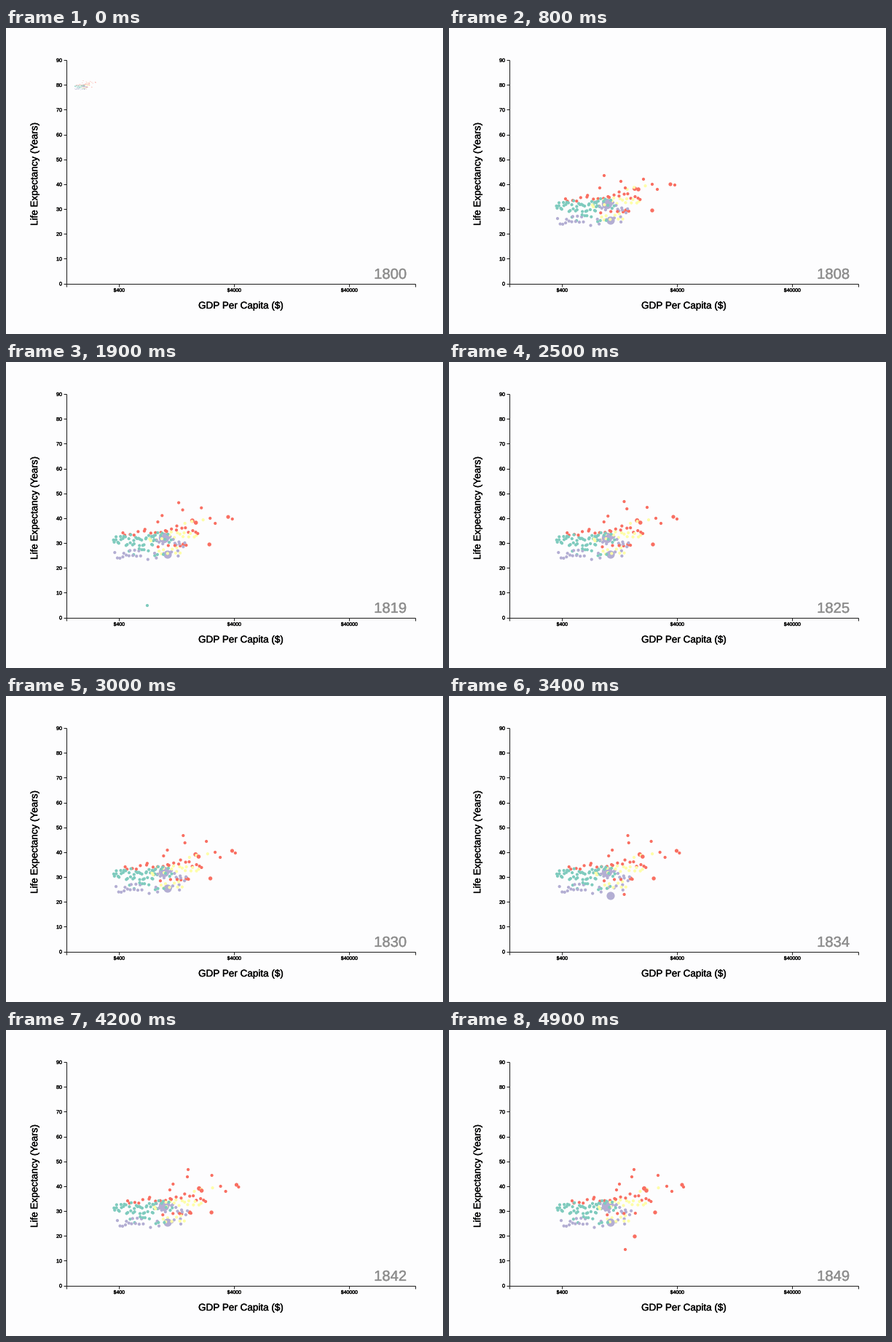
A matplotlib script that plays this animation: 600x421 px, repeating every 5000 ms.

```python
import matplotlib.pyplot as plt
import numpy as np
from matplotlib.animation import FuncAnimation
from matplotlib.patheffects import withStroke

W, H, DPI = 600, 421, 128
PX = 72 / DPI                       # points per pixel
LEFT, TOP, RIGHT, BOTTOM = 82.5, 44, 561.5, 351.5
DECADE = 158                        # width of one power of ten on the x axis
FRAMES, INTERVAL, FIRST_YEAR = 50, 100, 1800
ENTER = 0.18                        # progress of the dots when they first appear

TEAL, PURPLE, RED, YELLOW = "#7fcbbe", "#b3aed3", "#f96f62", "#fefea8"

# count, x range, y at both ends, y spread, drift to the right, colour
CLOUDS = [
    (36, 146, 205, 245, 245, 8, 1, TEAL),
    (12, 198, 228, 243, 245, 10, 2, TEAL),
    (10, 166, 223, 262, 260, 7, 2, TEAL),
    (13, 149, 186, 266, 262, 5, 5, PURPLE),
    (16, 202, 246, 242, 246, 9, 5, PURPLE),
    (8, 194, 242, 267, 264, 5, 5, PURPLE),
    (18, 194, 262, 241, 235, 6, 9, YELLOW),
    (8, 205, 242, 264, 257, 6, 8, YELLOW),
    (3, 240, 281, 222, 216, 1, 18, YELLOW),
    (14, 154, 238, 237, 228, 4, 9, RED),
    (7, 232, 266, 229, 233, 4, 15, RED),
    (4, 198, 250, 254, 251, 1, 9, RED),
]
# x, y, drift, change in height, radius of the dots outside the crowd
OUTLIERS = [
    (236, 211, 18, -19, 2.1), (267, 208, 20, -8, 2.1), (242, 220, 9, -18, 2.1),
    (213, 203, 21, 9, 2.1), (207, 220, 23, 0, 2.1), (304, 215, 16, -2, 2.6),
    (255, 221, 13, -3, 3.0), (260, 222, 11, -1, 2.8), (310, 216, 12, 0, 2.1),
    (279, 215, 20, 0, 2.1), (286, 222, 20, 0, 2.1), (279, 251, 4, 0, 2.7),
    (243, 251, 12, 0, 2.7), (239, 253, 3, 0, 2.1),
]
GIANTS = [(217, 242, 0, 0, 7.2), (222, 265, 0, 0, 5.6)]
# year, usual x and y of a dot, its height in that one year
DISASTERS = [(1819, 196, 251, 335), (1834, 222, 265, 275), (1834, 239, 253, 273),
             (1849, 239, 253, 302), (1849, 243, 251, 284)]

rng = np.random.default_rng(4)


def cloud(count, x0, x1, y0, y1, spread, drift, color):
    """Spread dots evenly but irregularly along a sloping band."""
    u = (np.arange(count) + rng.random(count)) / count
    x = x0 + u * (x1 - x0)
    y = y0 + u * (y1 - y0) + rng.uniform(-spread, spread, count)
    return [(a, b, drift, 0, 2.1, color) for a, b in zip(x, y)]


crowd = [dot for row in CLOUDS for dot in cloud(*row)]
crowd += [(*dot, RED) for dot in OUTLIERS]
crowd = [crowd[i] for i in rng.permutation(len(crowd))]
middle = len(crowd) * 3 // 4
dots = crowd[:middle] + [(*dot, PURPLE) for dot in GIANTS] + crowd[middle:]
x, y, drift, rise, radius = np.array([dot[:5] for dot in dots]).T
colors = [dot[5] for dot in dots]


def positions(frame):
    growth = np.clip((frame - 17) / 32, 0, 1)
    change = np.clip((frame - 8) / 12, 0, 1)
    xy = np.column_stack((x + drift * growth, y + rise * change))
    for when, usual_x, usual_y, low in DISASTERS:
        if when == FIRST_YEAR + frame:
            xy[np.hypot(x - usual_x, y - usual_y).argmin(), 1] = low
    return xy


plt.rcParams["font.family"] = "Liberation Sans"
plt.rcParams["text.hinting"] = "none"
fig = plt.figure(figsize=(W / DPI, H / DPI), dpi=DPI, facecolor="#fdfdfe")
ax = fig.add_axes([0, 0, 1, 1])
ax.set(xlim=(0, W), ylim=(H, 0))
ax.axis("off")


def line(xs, ys):
    ax.plot(xs, ys, color="#1c1c1c", lw=PX, solid_capstyle="butt")


def label(x, y, text, size, color="black", **style):
    options = dict(ha="center", va="baseline") | style
    bolder = withStroke(linewidth=0.3 * PX, foreground=color)
    return ax.text(x, y, text, fontsize=size * PX, color=color,
                   path_effects=[bolder], **options)


line((LEFT, LEFT), (TOP, BOTTOM))
line((LEFT, RIGHT), (BOTTOM, BOTTOM))
for value in range(0, 91, 10):
    tick = BOTTOM - value * (BOTTOM - TOP) / 90
    line((LEFT - 4, LEFT), (tick, tick))
    label(LEFT - 5.5, tick + 2.8, str(value), 7.1, ha="right")
for tick in (LEFT, RIGHT):
    line((tick, tick), (BOTTOM, BOTTOM + 4))
for i in range(3):
    tick = 155.3 + DECADE * i
    line((tick, tick), (BOTTOM, BOTTOM + 4))
    label(tick, 363, f"${4 * 10 ** (i + 2)}", 6.9)
label(322.5, 386, "GDP Per Capita ($)", 13.5)
label(39.5, 201, "Life Expectancy (Years)", 13.5, rotation=90, va="center")
year = label(527.7, 345, "", 20.2, color="#8e8e8e")

scatter = ax.scatter(x, y, c=colors, linewidths=0, zorder=3)


def draw(frame):
    progress = ENTER if frame == 0 else 1
    origin = np.array((LEFT, TOP))
    scatter.set_offsets(origin + progress * (positions(frame) - origin))
    scatter.set_sizes((2 * radius * progress * PX) ** 2)
    year.set_text(str(FIRST_YEAR + frame))
    return scatter, year


animation = FuncAnimation(fig, draw, frames=FRAMES, interval=INTERVAL,
                          repeat=True, repeat_delay=0)
plt.show()
```
